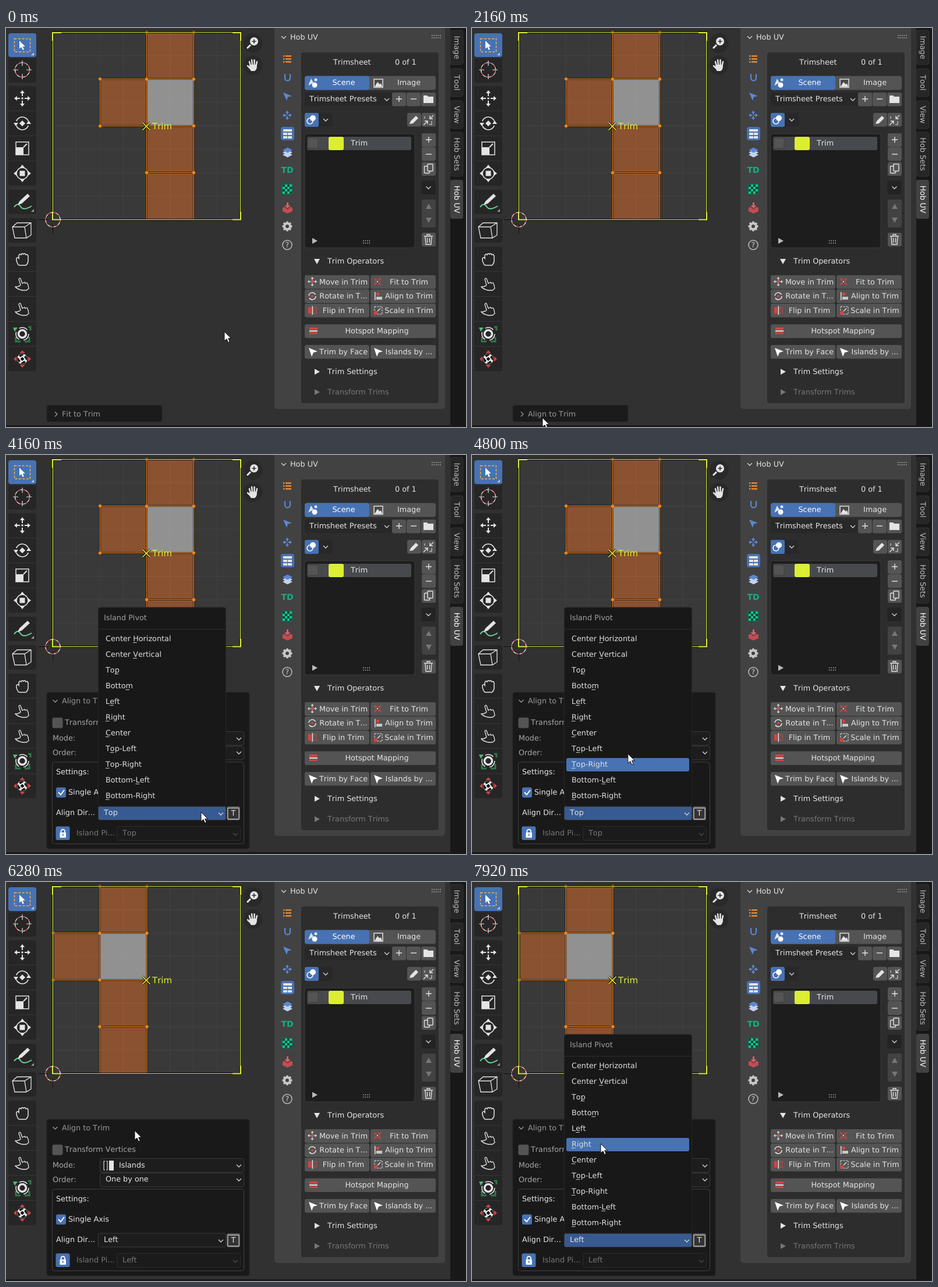
These frames come from a looping animation (790x686 px, 8000 ms). An HTML page:

```html
<!DOCTYPE html>
<html lang="en">
<head>
<meta charset="utf-8">
<title>Align to Trim</title>
<style>
html, body { margin: 0; width: 100%; height: 100%; overflow: hidden; background: #313131; }
svg { display: block; }
text {
  font-family: "DejaVu Sans", sans-serif; white-space: pre;
  font-kerning: none; font-variant-ligatures: none; text-rendering: geometricPrecision;
}
</style>
</head>
<body>
<svg id="stage" width="790" height="686" viewBox="0 0 790 686"></svg>
<script>
const LIGHT = '#e4e4e4', GREY = '#979797', BLUE = '#4772b3', BUTTON = '#545454',
      DARK = '#282828', ORANGE = '#f58312', YELLOW = '#dcf03a', SKY = '#5b88d4', RED = '#d24444';

// Drawing helpers: rectangles by edges, text by its vertical centre
const box = (x0, y0, x1, y1, fill, r = 0, extra = '') =>
  `<rect x="${x0}" y="${y0}" width="${x1 - x0}" height="${y1 - y0}" rx="${r}" fill="${fill}" ${extra}/>`;
const text = (x, y, s, fill = LIGHT, anchor = 'start', size = 12.8, extra = '') =>
  `<text x="${x}" y="${Math.round(y + 4.4)}" fill="${fill}" text-anchor="${anchor}" font-size="${size}" ${extra}>${s}</text>`;
const line = (d, stroke = LIGHT, width = 1.4, extra = '') =>
  `<path d="${d}" fill="none" stroke="${stroke}" stroke-width="${width}" ${extra}/>`;
const shape = (d, fill = LIGHT, extra = '') => `<path d="${d}" fill="${fill}" ${extra}/>`;
const disc = (x, y, r, fill, extra = '') => `<circle cx="${x}" cy="${y}" r="${r}" fill="${fill}" ${extra}/>`;
const ring = (x, y, r, stroke = LIGHT, width = 1.5, extra = '') =>
  disc(x, y, r, 'none', `stroke="${stroke}" stroke-width="${width}" ${extra}`);
const at = (x, y, content, scale = 1) => `<g transform="translate(${x} ${y}) scale(${scale})">${content}</g>`;
const group = (id, content) => `<g id="${id}">${content}</g>`;
const range = n => [...Array(n).keys()];
const turns = (content, n = 4) => range(n).map(i => `<g transform="rotate(${i * 360 / n})">${content}</g>`).join('');
const chevron = (x, y, color = '#cfcfcf') => line(`M${x - 4} ${y - 2}l4 4l4 -4`, color);
const triangle = (x, y, angle, color = LIGHT) =>
  `<path d="M-4 -5L5 0L-4 5Z" fill="${color}" transform="translate(${x} ${y}) rotate(${angle})"/>`;
const grip = (x, y, cols) => range(cols * 2).map(i =>
  box(x + (i % cols) * 3.5, y + (i / cols | 0) * 4, x + (i % cols) * 3.5 + 1.5, y + (i / cols | 0) * 4 + 1.5, '#b5b5b5')).join('');
const checker = (size, n, a, b) => range(n * n).map(i => {
  const x = (i % n - n / 2) * size, y = ((i / n | 0) - n / 2) * size;
  return box(x, y, x + size, y + size, (i % n + (i / n | 0)) % 2 ? a : b);
}).join('');

// Shared icon shapes, centred on the origin
const POINTER = 'M0 0V16L4 12.6L6.6 18.6L9.2 17.5L6.7 11.6H11.5Z';
const ARROWS = color => turns(shape('M0 -8L3.2 -4H1V-1.5H-1V-4H-3.2Z', color));
const FIST = 'M-7 10Q-11 3-10-1Q-8-4-6-1V-6q2-4 4-1q2-4 4-1q2-3 4 1q3-2 4 2V4Q9 9 6 11H-5Z';
const FINGERS = 'M-12 5Q-6 5-3 2L-6-8Q-5-11-3-9L0-1L4-3L5-1L8-2L10 2L11 8L7 11H0Q-9 9-12 5Z';
const OPEN_HAND = shape('M-6 1L-3 -1H5L7 2Q7 7 3 10H-3Q-6 7-6 1Z') +
  line('M-4 2L-6 -6M-1 0L-2 -9M2.5 0V-9M5.5 1L7 -6M-4 6L-9 1', LIGHT, 2.5, 'stroke-linecap="round"');
const plus = (x, y) => line(`M${x - 5} ${y}h10M${x} ${y - 5}v10`);
const minus = (x, y) => line(`M${x - 5} ${y}h10`);
const dashedRing = (x, y) => ring(x, y, 12.5, '#fff', 1.2) + ring(x, y, 12.5, '#e03030', 1.2, 'stroke-dasharray="4.9"');
const outlined = (d, color, width, halo) => line(d, '#000', halo, 'opacity=".6"') + line(d, color, width);

function viewport() {
  const grid = range(7).map(i => `M${120.5 + i * 40.25} 8V329M81 ${47.5 + i * 40.25}H402`).join('');
  const face = (x, y, fill = '#8a5231') => box(x, y, x + 81, y + 81, fill);
  const edges = 'M241.5 7.5V329M322.5 7.5V329M161.5 87.5V168.5M161.5 87.5H322.5M161.5 168.5H322.5M241.5 248.5H322.5';
  const island = face(241.5, 7.5) + face(161.5, 87.5) + face(241.5, 168) + face(241.5, 248.5) + face(241.5, 87.5, '#919191') +
    outlined(edges, ORANGE, 1.1, 3) +
    range(4).map(i => disc(241.5, 7.5 + i * 80.4, 2.6, ORANGE) + disc(322.5, 7.5 + i * 80.4, 2.6, ORANGE)).join('') +
    disc(161.5, 87.5, 2.6, ORANGE) + disc(161.5, 168.5, 2.6, ORANGE);
  return box(0, 0, 790, 686, '#313131') + box(80, 8, 403, 329, '#393939') + group('island', island) +
    line(grid, '#ffffff', 1, 'opacity=".045"') +
    outlined('M80.5 7.5H402.5V329.5H80.5Z', YELLOW, 1.2, 3.4) +
    line('M80 22V8H95M389 8H403V22M403 316V329.5H389M95 329.5H80V316', YELLOW, 2) +
    outlined('M234.5 162.5l13 13m0 -13l-13 13', YELLOW, 1.6, 4) + text(251, 170, 'Trim', YELLOW, 'start', 15) +
    dashedRing(80.5, 329.5) + line('M55 329.5H72M80.5 338V354', '#111', 1) +
    disc(424, 26, 16.5, '#292929') + disc(424, 64, 16.5, '#292929') +
    disc(426, 23, 7, LIGHT) + line('M420 29l-6 6', LIGHT, 3) + line('M422.5 23h7M426 19.5v7', '#292929', 1.6) +
    at(424, 64, OPEN_HAND);
}

function toolbar() {
  const groups = [[9, 2], [100, 4], [278, 1], [327, 1], [376, 5]];
  const backs = groups.map(([y, n]) => box(4, y, 52, y + n * 43 - 1, '#262626', 4) +
    range(n - 1).map(i => box(4, y + 42 + i * 43, 52, y + 43 + i * 43, '#353535')).join('')).join('');
  const arrow = shape('M0 -14L4 -9H-4Z') + line('M0 -9V-4', LIGHT, 2);
  const hand = line(FINGERS, LIGHT, 1.3);
  return backs + box(4, 9, 52, 50, BLUE, 4) +
    box(14.5, 18.5, 41.5, 41, 'none', 0, `stroke="#f3b15a" stroke-width="1.5" stroke-dasharray="4 2.5"`) +
    at(23, 22, shape(POINTER, '#fff'), 0.85) + shape('M48 42v5h-5z', '#b8c8e8') +
    dashedRing(28, 72) + line('M28 56v9M28 79v9M12 72h9M35 72h9', LIGHT, 1.2) +
    at(28, 121, turns(arrow) + box(-1.5, -1.5, 1.5, 1.5, LIGHT)) +
    at(28, 164, ring(0, 0, 11, LIGHT, 1.6, 'stroke-dasharray="26 8.5" transform="rotate(20)"') +
      shape('M0 -5L5 0L0 5L-5 0Z') + shape('M-15 -1l8 0l-4 6zM15 1h-8l4 -6z')) +
    box(17, 196, 39, 218, 'none', 0, `stroke="${LIGHT}" stroke-width="1.5"`) + box(17, 205, 30, 218, LIGHT) + line('M30 205l6 -6', LIGHT, 2) +
    at(28, 250, ring(0, 0, 10) + turns(shape('M0 -15L4 -10H-4Z')) + box(-4.5, -4.5, 4.5, 4.5, LIGHT)) +
    line('M14 308q6 -9 11 -1t19 -1', '#6bd49a', 2) + shape('M20 304l3 -6l14 -13l4 4l-14 13z') + shape('M48 311v5h-5z', '#999') +
    line('M11 342L19 335H43V356L35 361H15ZM11 342H32L35 361M32 342L43 335', LIGHT, 1.3) +
    at(28, 397, line(FIST, LIGHT, 1.5)) + at(28, 440, hand) + at(28, 483, hand) +
    line('M17 531V539H25M32 539H40V531M38 514H42V520', '#2d7a48', 3) +
    at(28, 526, ring(0, 0, 11, LIGHT, 1.6, 'stroke-dasharray="15 8"') + ring(0, 0, 6.5, LIGHT, 3.5) + shape('M-13 -4l-3 -7h8z', '#55b878')) +
    at(28, 569, turns(shape('M0 -15L4.5 -10H-4.5Z', RED)) + disc(0, 0, 9, LIGHT) +
      turns(shape('M0 -3L3 0L0 3L-3 0ZM-3 -8.5H3L0 -5Z', '#111') + shape('M3 -3L6 -6L8 -3L6 0Z', '#111')));
}

function sidebarIcons() {
  const listRows = range(3).map(i => box(476, 47 + i * 5, 478.5, 49.5 + i * 5, '#e08a3c') + box(480, 47 + i * 5, 490, 49.5 + i * 5, '#e08a3c')).join('');
  return listRows + line('M479 79V86a4.5 4.5 0 0 0 9 0V79', SKY, 2.2) +
    shape('M476 111L491 117L484 118.5L482 125Z', SKY) + at(483, 150, ARROWS(SKY)) +
    box(472, 170, 495, 193, BLUE, 4) + box(476, 174, 491, 178, LIGHT) +
    [180, 186].map(y => box(476, y, 483, y + 4, LIGHT) + box(484, y, 491, y + 4, LIGHT)).join('') +
    range(3).reverse().map(i => shape(`M475 ${210 + i * 4}l8.5 -4.5l8.5 4.5l-8.5 4.5z`, i ? '#c3d3ee' : SKY)).join('') +
    text(483, 245, 'TD', '#13b083', 'middle', 14, 'font-weight="bold"') +
    box(474, 268, 492, 286, '#0c7455', 2) + at(483, 277, checker(4, 4, '#16c08e', '#0a4936')) +
    shape('M475 309l4 -1.5l4.5 4.5l4.5 -4.5l4 1.5v6l-8.5 4l-8.5 -4z', '#c74a52') + shape('M482 300h3v5h3.5l-5 5l-5 -5h3.5z', '#d9626a') +
    at(483, 341, ring(0, 0, 5, '#c8c8c8', 4) + turns(box(-1.7, -8.5, 1.7, -5, '#c8c8c8'), 8)) +
    ring(483, 373, 8, '#bdbdbd', 1.5) + text(483, 373, '?', '#cfcfcf', 'middle', 12);
}

const operators = [
  ['Move in Trim', 513, 425, 624], ['Fit to Trim', 626, 425, 738],
  ['Rotate in T...', 513, 449.5, 624], ['Align to Trim', 626, 449.5, 738],
  ['Flip in Trim', 513, 474, 624], ['Scale in Trim', 626, 474, 738],
  ['Hotspot Mapping', 513, 509.5, 738],
  ['Trim by Face', 513, 545, 624], ['Islands by ...', 626, 545, 738]
];

function operatorIcons() {
  return at(526, 436, turns(shape('M0 -8L2.5 -5H-2.5Z') + box(-.7, -4.5, .7, -2.5, LIGHT)) + box(-2, -2, 2, 2, RED)) +
    at(638, 436, turns(line('M-6 -6L-2.5 -2.5', RED, 1.6) + shape('M-1.5 -1.5h-4l4 -4z', RED)) + box(-1, -1, 1, 1, LIGHT)) +
    at(526, 461, ring(0, 0, 6, LIGHT, 1.6, 'stroke-dasharray="15 4"') + disc(0, 0, 2, RED)) +
    box(633, 454, 634.5, 468, LIGHT) + box(636, 455, 641, 460, RED) + box(636, 462, 646, 467, '#c8c8c8') +
    box(519, 480, 524, 491, RED) + box(525.5, 478, 527, 493, LIGHT) + box(528.5, 480.5, 533, 490.5, 'none', 0, `stroke="${RED}"`) +
    box(633, 479, 646, 492, 'none', 0, `stroke="${LIGHT}" stroke-dasharray="3 1.5"`) + box(632, 487, 638, 493, RED) + line('M638 487l5 -5') +
    box(521, 515, 535, 519, RED) + box(521, 520, 535, 522, LIGHT) + box(521, 523, 535, 526, RED) +
    [520, 632].map(x => shape(`M${x} 550L${x + 15} 556L${x + 8} 558L${x + 5} 565Z`, '#fff')).join('');
}

function sidebar() {
  const button = (x, y, w = 24, fill = BUTTON) => box(x, y, x + w, y + 23.5, fill, 3);
  const page = (x, y) => box(x, y, x + 9, y + 12, BUTTON, 1, `stroke="${LIGHT}" stroke-width="1.4"`);
  return box(461, -10, 754, 655, '#424242', 5) + chevron(477, 16) + text(488, 16, 'Hob UV') + grip(731, 12, 5) + sidebarIcons() +
    box(507, 42, 743, 645, '#2d2d2d', 4) + text(562, 59, 'Trimsheet') + text(668, 59, '0 of 1') +
    box(513, 82.5, 738, 106.5, BUTTON, 4) + box(513, 82.5, 624, 106.5, BLUE, 4) + text(580, 94, 'Scene', '#fff', 'middle') + text(692, 94, 'Image', LIGHT, 'middle') +
    shape('M519 99l5 -12l4 7z') + disc(530, 98, 4.5, '#fff') + disc(532, 89, 2.5, '#dfe8f5') +
    box(631, 87, 648, 103, '#bcbcbc') + box(633, 89, 646, 101, '#4a4a4a') + shape('M633 101l5 -8l4 4l2 -2l2 6z') +
    box(513, 111, 662, 134, DARK, 3) + text(521, 122, 'Trimsheet Presets') + chevron(654, 123) +
    button(663, 111) + button(688, 111) + button(713, 111, 25) + plus(675, 122) + minus(700, 122) + shape('M717 116h6l2 2h9v11h-17z') +
    box(513, 146, 561, 170, DARK, 3) + box(513, 146, 537, 170, BLUE, 3) + ring(522, 160, 5, '#fff', 1.6) + disc(527, 155, 5, '#fff') + chevron(549, 158) +
    button(689, 146) + button(714, 146) + shape('M693 165l2 -5l9 -9l4 4l-9 9z') +
    line('M734 150l-6 6m0 -5v5h5M717 167l7 -7m-5 0h5v5') + line('M719 152v4M731 160v6h-4', LIGHT, 1) +
    box(513, 182, 702, 378, '#1d1d1d', 4, 'stroke="#3b3b3b"') + box(517, 187, 696, 210, '#48494d', 3) + box(518, 189, 536, 207, '#545454', 3, 'stroke="#3d3d3d"') +
    box(554, 187, 580, 210, '#dbee33', 3) + text(592, 198, 'Trim') + triangle(530, 366, 0, '#bbb') + grip(613, 365, 4) +
    button(714, 181) + button(714, 205) + button(714, 230.5) + plus(726, 192) + minus(726, 217) + page(718.5, 237.5) + page(724, 234) +
    button(713.5, 262.5, 24, '#232323') + chevron(725.5, 274.5) + box(714, 295, 738, 343, '#424242', 3) + triangle(726, 307, -90, '#777') + triangle(726, 330, 90, '#777') +
    button(714, 352) + line('M718 358h15M723 357v-2h5v2M720 359l1 13h9l1 -13M723.5 361v8M727.5 361v8', LIGHT, 1.3) +
    triangle(534, 401, 90) + text(552, 401, 'Trim Operators') +
    operators.map(([s, x, y, x1], i) => box(x, y, x1, y + 23.5, BUTTON, 3, 'class="operator"') +
      text(i === 6 ? 637 : x < 600 ? 579.5 : 692, y + 11.5, s, LIGHT, 'middle')).join('') + operatorIcons() +
    triangle(534, 591, 0) + text(552, 591, 'Trim Settings') + triangle(534, 626, 0, '#777') + text(552, 626, 'Transform Trims', '#777');
}

function tabs() {
  const list = [['Image', 4, 63], ['Tool', 70, 118], ['View', 125, 173], ['Hob Sets', 179, 255], ['Hob UV', 261, 328]];
  return box(763, 0, 790, 686, '#181818') + box(0, 683, 790, 686, '#181818') + list.map(([s, y0, y1], i) =>
    box(763, y0, 785, y1, i === 4 ? '#424242' : '#262626', 4, i === 4 ? '' : 'stroke="#333"') +
    `<g transform="translate(774 ${(y0 + y1) / 2}) rotate(90)">${text(0, 0, s, i === 4 ? '#fff' : '#bcbcbc', 'middle')}</g>`).join('');
}

function popup() {
  const border = 'stroke="#3a3a3a"';
  const field = (x, y, x1, id = '') => box(x + .5, y + .5, x1 - .5, y + 24, '#1d1d1d', 3, `${border} ${id}`);
  const closed = box(70, 648.5, 268, 677, '#1b1b1b', 4, 'stroke="#262626"') +
    line('M84 660l4 4l-4 4', GREY) + text(96, 664, 'Fit to Trim', GREY, 'start', 12.8, 'id="operation"');
  const open = box(70, 408, 418, 677, '#191919', 4, 'stroke="#242424"') + chevron(84.5, 423, GREY) + text(96, 423, 'Align to Trim', GREY) +
    box(79.5, 451.5, 97.5, 469.5, BUTTON, 3) + text(101, 460, 'Transform Vertices', '#a6a6a6') +
    text(80, 487, 'Mode:', '#a6a6a6') + field(161, 475, 409) + text(194, 487, 'Islands') + chevron(400, 488) +
    line('M170 480h-2v15h2M172 480h2v15h-2', LIGHT, 1.1) + box(177, 479, 185, 496, LIGHT) +
    text(80, 512, 'Order:', '#a6a6a6') + field(161, 500, 409) + text(171, 511, 'One by one') + chevron(400, 512) +
    box(79.5, 528, 408.5, 668.5, '#191919', 4, 'stroke="#424242"') + text(86, 545, 'Settings:') +
    box(86, 571.5, 103, 589, BLUE, 3) + line('M90 580l4 4l6 -8', '#fff', 2) + text(107, 580, 'Single Axis') +
    text(86, 615, 'Align Dir...') + field(158, 603.5, 378, 'id="direction"') + text(168, 615, 'Top', LIGHT, 'start', 12.8, 'class="side"') + chevron(369, 617) +
    box(379, 604, 402, 628, BUTTON, 3) + box(381, 607, 400, 626, '#333', 1, 'stroke="#bbb" stroke-width="1.3"') + text(390.5, 616, 'T', LIGHT, 'middle', 13) +
    box(85.5, 638.5, 109.5, 662, BLUE, 3) + box(92.5, 649, 103, 658, '#fff', 1) + line('M94.5 649v-2a3.2 3.2 0 0 1 6.5 0v2', '#fff', 1.8) + box(97, 651, 98.5, 655, BLUE) +
    text(121, 650, 'Island Pi...', '#777') + box(190.5, 638.5, 402.5, 662.5, '#1b1b1b', 3, 'stroke="#2b2b2b"') +
    text(200, 650, 'Top', '#777', 'start', 12.8, 'class="side"') + chevron(394, 652, '#484848');
  return group('closed', closed) + group('open', open);
}

// Each pivot with the index of its shortcut letter
const pivots = [['Center Horizontal', 7], ['Center Vertical', 7], ['Top', 2], ['Bottom', 5], ['Left', 1], ['Right', 0],
  ['Center', 0], ['Top-Left', 1], ['Top-Right', 0], ['Bottom-Left', 7], ['Bottom-Right', 0]];
const rowY = i => 316 + 27 * i;

function menu() {
  return group('menu', box(158.5, 262, 377.5, 604, '#181818', 4, 'stroke="#262626"') + text(168, 280, 'Island Pivot', '#a0a0a0') +
    box(159, 299, 377, 300, '#2e2e2e') + box(162, 0, 373, 23, BLUE, 3, 'id="highlight"') +
    pivots.map(([s], i) => text(171, rowY(i), s, '#dedede', 'start', 12.8, 'class="pivot"')).join(''));
}

const stage = document.getElementById('stage');
stage.innerHTML = viewport() + toolbar() + sidebar() + tabs() + popup() + menu() +
  disc(0, 0, 24, '#b8ac12', 'id="click" opacity=".9"') +
  shape(POINTER, '#fff', 'id="pointer" stroke="#111" stroke-width="1"');

const $ = id => document.getElementById(id);
const labels = [...document.querySelectorAll('.pivot')], sides = [...document.querySelectorAll('.side')],
      buttons = [...document.querySelectorAll('.operator')];
labels.map((label, i) => [label.getStartPositionOfChar(pivots[i][1]).x, rowY(i)])
  .forEach(([x, y]) => $('menu').insertAdjacentHTML('beforeend', text(x, y, '_', '#dedede')));

// Pointer moves: start, end, then the three points of a quadratic curve
const smooth = u => u * u * (3 - 2 * u), easeOut = u => u * (2 - u);
const moves = [
  [360, 920, [375, 522], [540, 500], [690, 461]],
  [1720, 2160, [690, 461], [400, 560], [121, 670]],
  [3200, 3840, [121, 670], [194, 683], [335, 614]],
  [4560, 5360, [335, 614], [260, 512], [221, 425], easeOut],
  [6240, 6840, [221, 425], [222, 520], [231, 620]],
  [7400, 7900, [231, 620], [222, 530], [221, 450]]
];
const clicks = [[1200, 1280], [2520, 2600], [4040, 4160], [5520, 5600], [6920, 7040]];

function pointerAt(t) {
  const [start, end, a, b, c, ease = smooth] = moves.findLast(m => t >= m[0]) || moves[0];
  const s = ease(Math.min(1, Math.max(0, (t - start) / (end - start)))), r = 1 - s;
  return a.map((v, i) => r * r * v + 2 * r * s * b[i] + s * s * c[i]);
}

const show = (id, on) => $(id).setAttribute('display', on ? 'inline' : 'none');

function draw(t) {
  const [x, y] = pointerAt(t);
  const pressed = clicks.some(([on, off]) => t >= on && t < off);
  const menuOpen = t >= 4040 && t < 5680 || t >= 6920, expanded = t >= 2720, left = t >= 5680;
  for (const id of ['pointer', 'click']) $(id).setAttribute('transform', `translate(${x} ${y})`);
  show('click', pressed);
  show('open', expanded);
  show('closed', !expanded);
  show('menu', menuOpen);
  $('operation').textContent = t < 1400 ? 'Fit to Trim' : 'Align to Trim';
  $('direction').setAttribute('fill', menuOpen ? '#385a92' : '#1d1d1d');
  $('island').setAttribute('transform', `translate(${left ? -80.5 : 0} 0)`);
  sides.forEach(el => el.textContent = left ? 'Left' : 'Top');
  buttons.forEach((el, i) => {
    const [, x0, y0, x1] = operators[i];
    const over = x >= x0 && x < x1 && y >= y0 && y < y0 + 24;
    el.setAttribute('fill', !over ? BUTTON : pressed ? BLUE : '#656565');
  });
  // The highlight trails the pointer by one refresh
  const row = Math.floor((pointerAt(t - 40)[1] - 302.5) / 27);
  show('highlight', menuOpen && row >= 0 && row < pivots.length);
  $('highlight').setAttribute('y', rowY(row) - 11);
}

function tick() {
  draw(Math.floor(performance.now() % 8000 / 40) * 40);
  requestAnimationFrame(tick);
}
tick();
</script>
</body>
</html>
```
